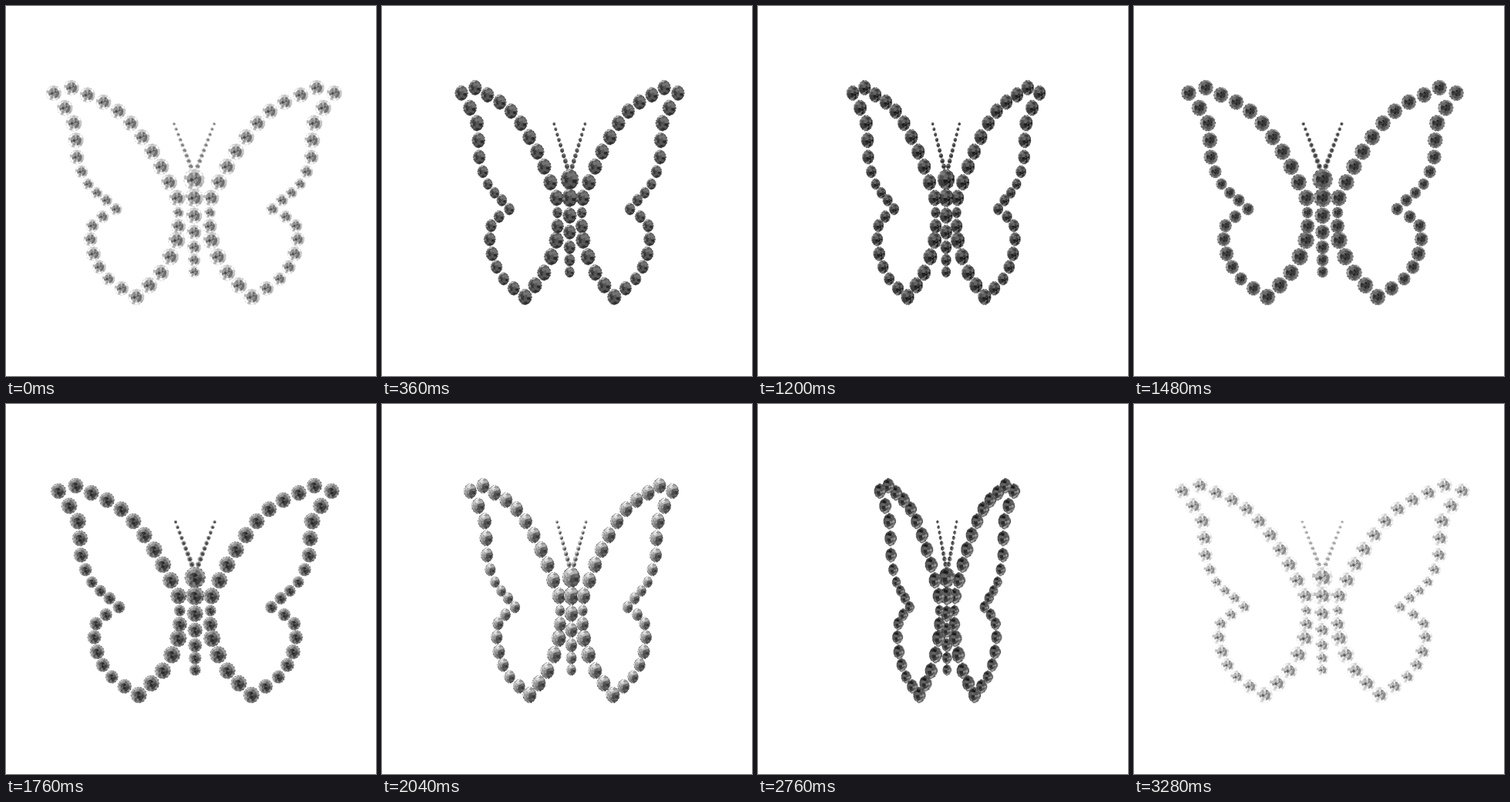
Write an HTML page with a canvas that moves like this. It is 480 px wide and 480 px high and loops after 3.32 s.

```html
<!DOCTYPE html>
<html lang="en">
<head>
<meta charset="utf-8">
<title>Rhinestone butterfly</title>
<style>
html, body { margin: 0; width: 100%; height: 100%; overflow: hidden; background: #fff; }
canvas { display: block; width: 480px; height: 480px; }
</style>
</head>
<body>
<canvas id="stage" width="480" height="480"></canvas>
<script>
const ctx = document.getElementById('stage').getContext('2d');
const LOOP = 3320, STEP = 40, POSES = 82, AXIS = 244.5, TAU = Math.PI * 2;
const clamp = (v, lo, hi) => Math.max(lo, Math.min(hi, v));

// Smooth curve through knots, n gems per span; a knot is [distance from axis, y, radius]
function strand(n, knots) {
  const last = knots.length - 1;
  const slope = (i, k) => {
    const a = Math.max(i - 1, 0), b = Math.min(i + 1, last);
    return (knots[b][k] - knots[a][k]) / (b - a);
  };
  return Array.from({ length: last * n + 1 }, (_, g) => {
    const i = Math.min(Math.floor(g / n), last - 1), t = g / n - i, w = t * t * (3 - 2 * t);
    return knots[i].map((v, k) => v + (knots[i + 1][k] - v) * w
      + slope(i, k) * t * (1 - t) * (1 - t) - slope(i + 1, k) * t * t * (1 - t));
  });
}

const topEdge = strand(3, [[159, 106, 9.5], [98.5, 136.5, 9.5], [54.5, 189, 10], [22, 249, 10]]);
const outerEdge = strand(2, [[182, 113, 9.5], [156, 152, 10], [152, 196, 9], [137.5, 231, 7], [114, 252, 7.5]]);
const lowerEdge = strand(2, [[101.5, 263.5, 7.5], [132, 285, 8], [130.5, 321.5, 9], [111, 354, 8], [75, 377.5, 10]]);
const innerEdge = strand(2, [[75, 377.5, 10], [43, 346, 10], [22.5, 304, 10.5], [20.5, 268, 7]]).slice(1);
const antenna = strand(8, [[26, 153, 2.1], [4.4, 208, 3.4]]);
const body = strand(2, [[0, 225, 13], [0, 272, 10], [0, 313, 8.5], [0, 345, 7]]);

const gems = body.map(([, y, r]) => ({ x: -0.5, y, r }));
for (const [d, y, r] of [topEdge, outerEdge, lowerEdge, innerEdge, antenna].flat()) {
  gems.push({ x: -d - 0.5, y, r }, { x: d - 0.5, y, r });
}

// Gem profile from the tip to the flat back: radius, depth
const profile = [[0, 0.8], [0.4, 0.62], [0.75, 0.38], [1, 0], [0.8, -0.38], [0.45, -0.62], [0, -0.7]];
const SIDES = 14, R = 28, HALF = 32;
const sprite = document.createElement('canvas');
sprite.width = sprite.height = HALF * 2;
const pen = sprite.getContext('2d');

function hash(i, j) {
  const s = Math.sin(i * 127.1 + j * 311.7) * 43758.5;
  return s - Math.floor(s);
}

// Steady turn that loses one pose in its second half
function turn(t) {
  const n = t / STEP;
  return (n - clamp((n - 51) / 16, 0, 1)) / POSES * TAU;
}

// Two glares: a sharp one on the front, a soft one on the back
function lighting(theta) {
  const glare = (at, power) => Math.max(0, Math.cos(theta - at)) ** power;
  const front = glare(-0.21, 24), back = glare(3.87, 8);
  const s = Math.sin(theta), c = Math.cos(theta);
  return {
    base: 90 + 145 * front + 55 * back,
    lx: -55 * s - 110 * back,
    ly: -45 * s - 90 * back,
    rim: 25 + 130 * c ** 4 * (1 - 0.6 * back),
    sparkle: 28 + 45 * front + 27 * s * s,
    outline: 0.65 * (1 - front)
  };
}

function drawSprite(theta) {
  const { base, lx, ly, rim, sparkle, outline } = lighting(theta);
  const c = Math.cos(theta), s = Math.sin(theta);
  const point = (i, j) => {
    const [r, z] = profile[i], a = j / SIDES * TAU;
    return [r * Math.cos(a) * c - z * s, r * Math.sin(a)];
  };
  const faces = [];
  for (let i = 0; i < profile.length - 1; i++) {
    for (let j = 0; j < SIDES; j++) {
      const q = [point(i, j), point(i + 1, j), point(i + 1, j + 1), point(i, j + 1)];
      let area = 0, u = 0, v = 0;
      q.forEach(([x, y], k) => {
        const [nx, ny] = q[(k + 1) % 4];
        area += x * ny - y * nx;
        u += x / 4;
        v += y / 4;
      });
      if (area <= 0) continue;
      const glint = Math.sin(hash(i + 1, j + 1) * TAU + theta * 3);
      const light = base + lx * u + ly * v + rim * (u * u + v * v - 0.4) + sparkle * glint;
      const path = new Path2D();
      q.forEach(([x, y]) => path.lineTo(HALF + x * R, HALF + y * R));
      path.closePath();
      faces.push([path, Math.round(clamp(light, 18, 254))]);
    }
  }
  pen.clearRect(0, 0, HALF * 2, HALF * 2);
  pen.lineJoin = 'round';
  pen.lineWidth = 4;
  pen.setLineDash([7, 4]);
  pen.strokeStyle = `rgba(20,20,20,${outline})`;
  faces.forEach(([path]) => pen.stroke(path));
  pen.setLineDash([]);
  pen.lineWidth = 0.8;
  for (const [path, l] of faces) {
    pen.fillStyle = pen.strokeStyle = `rgb(${l},${l},${l})`;
    pen.fill(path);
    pen.stroke(path);
  }
}

function draw(t) {
  const theta = turn(t), c = Math.cos(theta), s = Math.sin(theta);
  drawSprite(theta);
  ctx.fillStyle = '#fff';
  ctx.fillRect(0, 0, 480, 480);
  ctx.imageSmoothingQuality = 'high';
  gems.sort((a, b) => (a.x - b.x) * s || a.y - b.y);
  for (const g of gems) {
    const h = g.r * HALF / R;
    ctx.drawImage(sprite, AXIS + g.x * c - 1.3 * s - h, g.y - h, h * 2, h * 2);
  }
}

const start = performance.now();
function tick() {
  const t = (performance.now() - start) % LOOP;
  draw(Math.floor(t / STEP) * STEP);
  requestAnimationFrame(tick);
}
tick();
</script>
</body>
</html>
```
